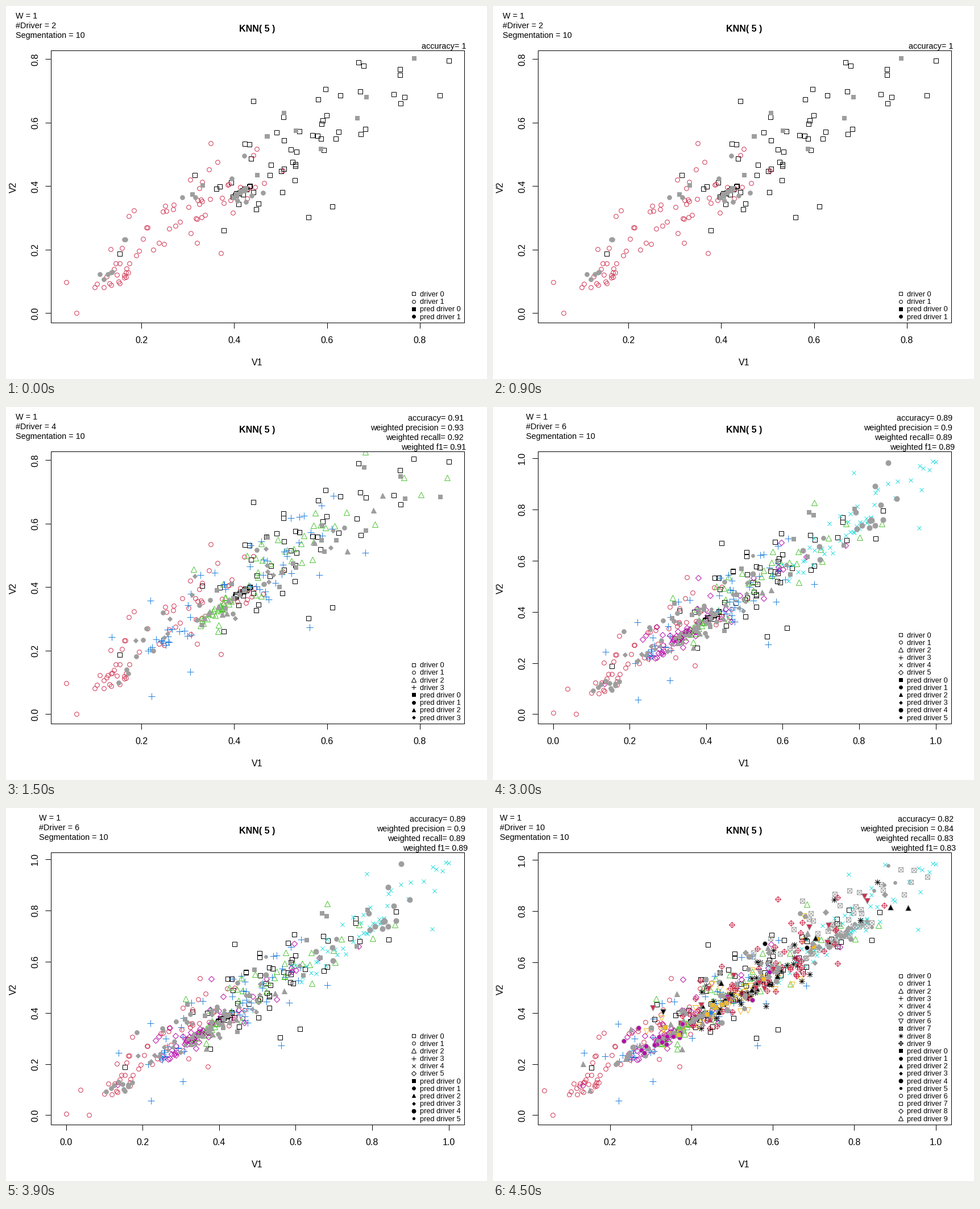
Recreate the animation shown at these times as a matplotlib script. Size 846 by 655 pixels, loop 6 s.

```python
import numpy as np
import matplotlib.pyplot as plt
from matplotlib.animation import FuncAnimation
from matplotlib.patches import Rectangle

W, H = 846, 655
LEFT, TOP, RIGHT, BOTTOM = 78.5, 78.5, 805.5, 556.5
GREY, RED, GREEN, BLUE = "#9e9e9e", "#d0304f", "#4fc536", "#2482de"
CYAN, MAGENTA, YELLOW = "#30dcdf", "#b80aab", "#f1b91f"
COLORS = ["black", RED, GREEN, BLUE, CYAN, MAGENTA, YELLOW, GREY, "black", RED]

# Each view: number of drivers, x origin and scale, y scale (pixels per unit),
# first and last x tick, last y tick, note position, scores and their position.
VIEWS = [
    dict(count=2, x0=74.7, sx=816.5, sy=557.5, ticks=(1, 4, 4), note_x=17,
         scores=[1], score_x=805),
    dict(count=4, x0=74.7, sx=816.5, sy=557.5, ticks=(1, 4, 4), note_x=17,
         scores=[.91, .93, .92, .91], score_x=805),
    dict(count=6, x0=105.5, sx=673, sy=449.5, ticks=(0, 5, 5), note_x=58,
         scores=[.89, .9, .89, .89], score_x=808),
    dict(count=10, x0=62.3, sx=716.3, sy=448, ticks=(1, 5, 5), note_x=12,
         scores=[.82, .84, .83, .83], score_x=810),
]
Y0 = 539.5
TEST_SHARE = .22
SLOPE = .95

HOLLOW = [[("s", 7.2)], [("o", 7.6)], [("^", 9.6)], [("+", 11.4)], [("x", 7)],
          [("D", 7.6)], [("v", 9.6)], [("s", 7.2), ("x", 7.2)],
          [("+", 10.6), ("x", 7.4)], [("D", 7.4), ("+", 10.4)]]
FILLED = [("s", 7), ("o", 7.6), ("^", 9), ("D", 5), ("o", 9), ("o", 5.6),
          ("o", 8), ("s", 7.2), ("D", 7.4), ("^", 9.6), ("v", 9.6)]
FIRST_TINTED = 6

# Per driver: clouds as (centre x, centre y, spread along, spread across, count).
CLOUDS = [
    [(.415, .385, .012, .004, 22), (.54, .53, .13, .055, 62)],
    [(.135, .105, .02, .014, 20), (.30, .31, .10, .045, 64)],
    [(.355, .32, .022, .008, 32), (.55, .53, .13, .04, 40)],
    [(.255, .24, .02, .008, 18), (.46, .44, .13, .05, 54)],
    [(.80, .735, .02, .006, 18), (.83, .82, .08, .04, 24), (.66, .61, .05, .025, 22)],
    [(.32, .29, .04, .012, 42), (.42, .40, .13, .04, 34)],
    [(.44, .40, .06, .016, 32), (.53, .51, .13, .04, 26)],
    [(.74, .675, .05, .006, 34), (.76, .75, .11, .045, 44)],
    [(.53, .48, .07, .014, 36), (.65, .62, .13, .045, 22)],
    [(.55, .50, .08, .03, 34), (.63, .62, .13, .05, 38)],
]
# A few outlying points of each driver.
OUTLIERS = [
    [(.862, .795), (.757, .769), (.154, .187), (.441, .668), (.56, .303), (.612, .336)],
    [(0, .005), (.06, 0), (.038, .098), (.35, .536), (.173, .306), (.371, .19)],
    [(.859, .745), (.683, .826), (.313, .456)],
    [(.222, .057), (.305, .133), (.614, .687), (.562, .273)],
    [(.999, .986), (.992, .988), (.956, .728), (.786, .945), (.957, .97)],
    [(.764, .66), (.379, .533), (.596, .67)],
    [(.677, .78), (.29, .33)],
    [(.946, .962), (.98, .934), (.673, .84)],
    [(.857, .914), (.75, .845), (.583, .427)],
    [(.612, .847), (.5, .746), (.873, .823)],
]


def driver_points(driver):
    """Outliers first, then clouds stretched along the common diagonal."""
    rng = np.random.default_rng(40 + driver)
    along_axis = np.array([1, SLOPE]) / np.hypot(1, SLOPE)
    across_axis = np.array([-along_axis[1], along_axis[0]])
    groups = [np.array(OUTLIERS[driver], float)]
    for cx, cy, along, across, count in CLOUDS[driver]:
        u, v = rng.triangular(-2.4, 0, 2.4, (2, count, 1))
        # The diagonal is longer than either axis, so stretch along it.
        groups.append((cx, cy) + 1.3 * u * along * along_axis + v * across * across_axis)
    return np.abs(np.vstack(groups))


DATA = [driver_points(d) for d in range(10)]

fig = plt.figure(figsize=((W + .001) / 72, (H + .001) / 72), dpi=72, facecolor="white")
ax = fig.add_axes([0, 0, 1, 1])


def mark(x, y, shape, size, edge, fill="none", clip=None):
    line, = ax.plot(x, y, ls="none", marker=shape, ms=size, mec=edge, mfc=fill, mew=1)
    if clip is not None:
        line.set_clip_path(clip)


def label(x, y, text, size=16, **style):
    style = {"va": "baseline", "family": "Liberation Sans", **style}
    ax.text(x, y, text, size=size, rotation_mode="anchor", **style)


def draw_points(index, view, box):
    """Training points stay hollow; a random share is shown as predictions."""
    rng = np.random.default_rng(70 + index)
    count = view["count"]
    shift = int(count == 10)
    predictions = []
    for driver in range(count):
        x = view["x0"] + view["sx"] * DATA[driver][:, 0]
        y = Y0 - view["sy"] * DATA[driver][:, 1]
        tested = rng.random(len(x)) < TEST_SHARE
        tested[:len(OUTLIERS[driver])] = False
        wrong = rng.random(len(x)) > view["scores"][0]
        guess = np.where(wrong, rng.integers(0, count, len(x)), driver)
        for shape, size in HOLLOW[driver]:
            mark(x[~tested], y[~tested], shape, size, COLORS[driver], clip=box)
        predictions += [(x[i], y[i], guess[i] + shift, driver) for i in np.flatnonzero(tested)]
    for x, y, symbol, driver in predictions:
        fill = COLORS[driver] if symbol >= FIRST_TINTED else GREY
        mark(x, y, *FILLED[symbol], GREY, fill, box)


def draw_axes(view):
    first_x, last_x, last_y = view["ticks"]
    style = dict(color="black", lw=1, solid_capstyle="butt")
    for step in range(first_x, last_x + 1):
        x = view["x0"] + view["sx"] * step / 5
        ax.plot([x, x], [BOTTOM, BOTTOM + 10], **style)
        label(x, 592, f"{step / 5:.1f}", ha="center")
    for step in range(last_y + 1):
        y = Y0 - view["sy"] * step / 5
        ax.plot([LEFT - 10, LEFT], [y, y], **style)
        label(56, y, f"{step / 5:.1f}", ha="center", rotation=90)
    label(442, 631, "V1", ha="center")
    label(18, 318, "V2", ha="center", rotation=90)
    label(442, 45, "KNN( 5 )", ha="center", weight="bold")


def draw_notes(view):
    notes = ["W = 1", f"#Driver = {view['count']}", "Segmentation = 10"]
    for row, text in enumerate(notes):
        label(view["note_x"], 22 + 17 * row, text, 14.4)
    names = ["accuracy=", "weighted precision =", "weighted recall=", "weighted f1="]
    scores = view["scores"]
    for row, (name, score) in enumerate(zip(names, scores)):
        below = len(scores) - 1 - row
        label(view["score_x"] + 4 * (below == 0), 75 - 17 * below,
              f"{name} {score}", 14.4, ha="right")


def draw_legend(count):
    for row in range(2 * count):
        y = 545 - 13.17 * (2 * count - 1 - row)
        driver = row % count
        predicted = row >= count
        shapes = [FILLED[driver]] if predicted else HOLLOW[driver]
        fill = "black" if predicted and driver < FIRST_TINTED else "none"
        for shape, size in shapes:
            mark(716.5, y, shape, size * .76, "black", fill)
        label(728, y + 4.5, f"{'pred ' if predicted else ''}driver {driver}", 12.8)


def draw(index):
    view = VIEWS[index]
    ax.clear()
    ax.set(xlim=(0, W), ylim=(H, 0))
    ax.axis("off")
    box = ax.add_patch(Rectangle((LEFT, TOP), RIGHT - LEFT, BOTTOM - TOP,
                                 fill=False, lw=1, ec="black", zorder=3))
    draw_points(index, view, box)
    draw_axes(view)
    draw_notes(view)
    draw_legend(view["count"])
    return []


anim = FuncAnimation(fig, draw, frames=len(VIEWS), interval=1500, init_func=lambda: [],
                     repeat=True, repeat_delay=0)
plt.show()
```
